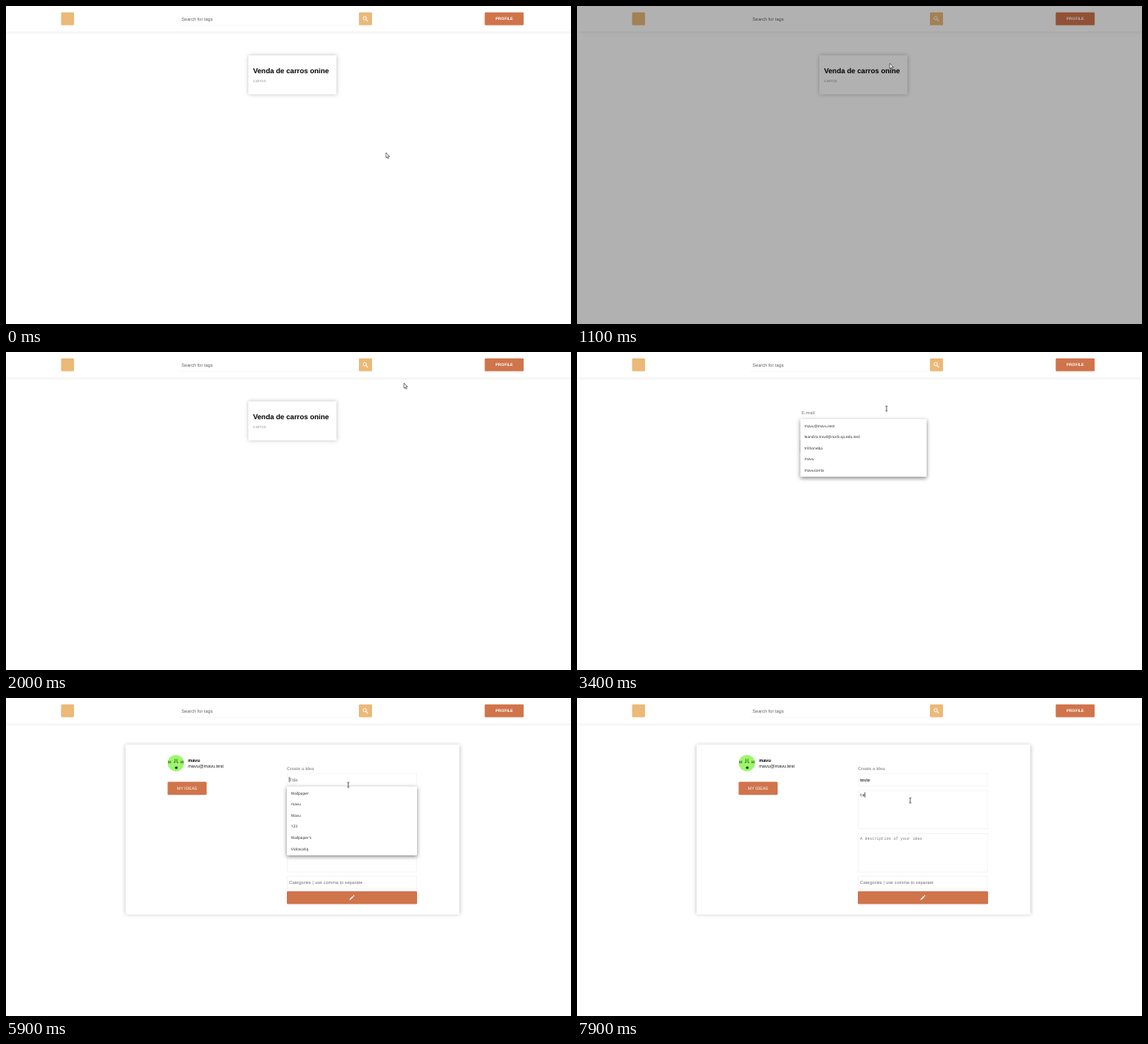
An HTML page with a canvas that plays this animation: 690 px wide and 388 px high, repeating every 8 s.

```html
<!DOCTYPE html>
<html lang="en">
<head>
<meta charset="utf-8">
<title>Idea board</title>
<style>
html, body { margin: 0; width: 100%; height: 100%; overflow: hidden; background: #fff; }
canvas { display: block; width: 100%; height: 100%; }
</style>
</head>
<body>
<canvas id="stage"></canvas>
<script>
const W = 690, H = 388, LOOP = 8000, STEP = 100;
const canvas = document.getElementById('stage');
const ctx = canvas.getContext('2d');

const SANS = '"Liberation Sans", Arial, sans-serif';
const MONO = '"Liberation Mono", monospace';
const MENU = '"Open Sans", sans-serif';
const CLAY = '#d0744b', SAND = '#ebb978', HINT = '#757575', INK = '#111';

const USER = 'mavu', MAIL = 'mavu@mavu.test';
const MAILS = [MAIL, 'leandro.trovil@norb.xp.edu.test', 'trilhoneba', USER, 'mavuconta'];
const TITLES = ['Wallpaper', USER, 'Mavu', '123', "Wallpaper's", 'VidracaXq'];

// Pointer stops: time, x, y
const PATH = [
  [0, 464, 179], [300, 74, 11], [400, 240, 14], [600, 637, 11], [900, 382, 70],
  [1200, 382, 70], [1700, 486, 38], [2000, 486, 38], [2300, 606, 15], [2500, 606, 15],
  [2800, 378, 69], [3800, 378, 69], [4000, 325, 89], [4100, 325, 91], [4200, 325, 99],
  [5300, 325, 99], [5700, 418, 106], [7000, 418, 106], [7300, 407, 125], [LOOP, 407, 125]
];

function pointerAt(t) {
  const i = PATH.findIndex(p => p[0] > t);
  const [t0, x0, y0] = PATH[i - 1], [t1, x1, y1] = PATH[i];
  const k = (t - t0) / (t1 - t0);
  return [x0 + (x1 - x0) * k, y0 + (y1 - y0) * k];
}

const within = (t, a, b) => t >= a && t < b;

// y is the middle of the capitals
function text(str, x, y, size = 5.6, color = INK, { weight = 400, font = SANS, align = 'left' } = {}) {
  ctx.font = `${weight} ${size}px ${font}`;
  ctx.textAlign = align;
  ctx.fillStyle = color;
  ctx.fillText(str, x, y + size * 0.355);
  return ctx.measureText(str).width;
}

function box(x, y, w, h, color, radius = 0) {
  ctx.fillStyle = color;
  ctx.beginPath();
  ctx.roundRect(x, y, w, h, radius);
  ctx.fill();
}

function panel(x, y, w, h, blur, alpha, drop = 0, radius = 0) {
  ctx.save();
  const s = ctx.getTransform().a;
  ctx.shadowColor = `rgba(0,0,0,${alpha})`;
  ctx.shadowBlur = blur * s;
  ctx.shadowOffsetY = drop * s;
  box(x, y, w, h, '#fff', radius);
  ctx.restore();
}

function field(x, y, w, h) {
  ctx.strokeStyle = '#ececec';
  ctx.lineWidth = 0.5;
  ctx.strokeRect(x + 0.25, y + 0.25, w - 0.5, h - 0.5);
}

function button(x, y, w, h, label, size, weight) {
  box(x, y, w, h, CLAY, 1.3);
  if (label) text(label, x + w / 2, y + h / 2, size, '#fff', { weight, align: 'center' });
}

function line(points, color, width) {
  ctx.strokeStyle = color;
  ctx.lineWidth = width;
  ctx.beginPath();
  points.forEach(([x, y], i) => i ? ctx.lineTo(x, y) : ctx.moveTo(x, y));
  ctx.stroke();
}

function dot(x, y, r, color) {
  ctx.fillStyle = color;
  ctx.beginPath();
  ctx.arc(x, y, r, 0, Math.PI * 2);
  ctx.fill();
}

function caret(x, y) {
  box(x, y - 3.3, 0.6, 6.6, '#000');
}

function header() {
  panel(0, -6, W, 37.3, 5, 0.16);
  box(67.3, 7.8, 15.8, 15.8, SAND, 1.3);
  text('Search for tags', 214.3, 15.6, 5.65, '#666');
  box(212, 23, 219, 0.5, '#f1f1f1');
  box(431, 7.8, 16, 15.8, SAND, 1.3);
  ctx.strokeStyle = '#fff';
  ctx.lineWidth = 0.9;
  ctx.beginPath();
  ctx.arc(438.1, 14.8, 2, 0, Math.PI * 2);
  ctx.stroke();
  line([[439.6, 16.3], [441.9, 18.6]], '#fff', 1.1);
  button(584.6, 7.8, 47.6, 15.8, 'PROFILE', 4.9, 700);
}

function homePage() {
  panel(296, 60.3, 107.5, 47.5, 5, 0.24);
  text('Venda de carros onine', 301.7, 79, 8.7, '#000', { weight: 700 });
  text('carros', 301.8, 91.3, 5.7, '#aaa');
}

function menu(x, y, w, items, hover) {
  const pitch = 13.55;
  panel(x, y, w, items.length * pitch + 2.8, 5, 0.5, 1.6, 0.8);
  items.forEach((item, i) => {
    const mid = y + 8.4 + i * pitch;
    if (i === hover) box(x, mid - pitch / 2, w, pitch, '#ececec');
    text(item, x + 5, mid, 4.6, '#222', { font: MENU });
  });
}

function loginPage(t) {
  const x = 272.7, w = 154.3;
  const filled = t >= 4100;
  const typed = [4500, 4800, 4900].filter(k => t >= k).length;

  if (filled) box(x, 65.8, w, 15.7, '#e8f0fe');
  text(filled ? MAIL : 'E-mail', 274.2, 73.6, 5.6, filled ? INK : HINT);

  if (typed) {
    for (let i = 0; i < typed; i++) dot(275.5 + i * 2.3, 94.6, 0.85, INK);
    ctx.fillStyle = '#222';
    ctx.beginPath();
    ctx.ellipse(420.7, 94.5, 2.9, 1.9, 0, 0, Math.PI * 2);
    ctx.fill();
    dot(420.7, 94.5, 1.35, '#fff');
    dot(420.7, 94.5, 0.8, '#222');
  } else {
    text('Password', 274.2, 94.4, 5.6, HINT);
  }
  if (t >= 4200) caret(274.4 + typed * 2.3, 94.4);

  button(x, 107, w, 16, 'SUBMIT', 5.1, 700);
  text('Create a account', x, 128.6, 5.5, '#333');

  if (within(t, 2900, 3400) || within(t, 3900, 4100)) caret(274.2, 73.6);
  if (within(t, 2900, 4100)) menu(x, 81.8, w, MAILS, t >= 4000 ? 0 : -1);
}

function avatar() {
  dot(207.5, 79.4, 10, '#9bf76a');
  for (const x of [199.8, 215]) {
    line([[x - 1.2, 76.5], [x - 1.2, 79.8]], '#243018', 0.6);
    line([[x - 1.2, 78.2], [x + 1.2, 78.2]], '#243018', 0.6);
    line([[x + 1.2, 76.5], [x + 1.2, 79.8]], '#243018', 0.6);
  }
  line([[206.3, 74.3], [206.3, 78.8], [204.8, 78.8]], '#243018', 0.7);
  line([[208.8, 74.3], [208.8, 78.8], [210.4, 78.8]], '#243018', 0.7);
  dot(208, 85, 1.6, '#111');
}

function profilePage(t) {
  const x = 343, w = 159, left = 345.7;
  const mono = { font: MONO };
  panel(146, 56.7, 407.6, 207.6, 5, 0.28);
  avatar();
  text(USER, 222.2, 76.2, 5.6, '#000', { weight: 700 });
  text(MAIL, 222.2, 83, 5.6, '#222');
  button(197.4, 102.3, 47.6, 16, 'MY IDEAS', 5.2, 400);

  text('Create a Idea', x, 85.7, 5.3, '#999', { weight: 700 });
  field(x, 91.8, w, 15.6);
  field(x, 112.6, w, 47.2);
  field(x, 165.2, w, 47.2);
  field(x, 217.5, w, 15.6);

  const title = 'teste'.slice(0, t < 6500 ? 0 : t < 6700 ? (t - 6400) / 100 : (t - 6300) / 100);
  const titleW = text(title || 'Title', left + (title ? 0 : 0.4), 99.7, 5.6, title ? INK : HINT);
  if (within(t, 5800, 6300) || within(t, 6500, 7100)) caret(left + (title ? titleW : 0), 99.5);

  const body = 'te'.slice(0, Math.max(0, t - 7700) / 100);
  const bodyW = text(body || 'A short description of your idea', left, 118.4, 4.85, body ? INK : HINT, mono);
  if (within(t, 7100, 7600) || t >= 7800) caret(left + (body ? bodyW : 0), 118.3);

  text('A description of your idea', left, 171, 4.85, HINT, mono);
  text('Categories | use comma to separate', left, 225.3, 5.57, HINT);

  button(x, 235.8, w, 15.7);
  line([[420.1, 245.8], [423.7, 242.2]], '#fff', 1.6);
  line([[424.2, 241.7], [425.1, 240.8]], '#fff', 1.6);
  line([[419.5, 246.4], [420.3, 245.6]], '#fff', 0.9);

  if (within(t, 5800, 6500)) menu(x, 107.8, w, TITLES, -1);
}

function arrow(x, y) {
  const shape = [[0, 0], [0, 6.3], [1.4, 5], [2.4, 7.2], [3.4, 6.7], [2.5, 4.6], [4.4, 4.5]];
  ctx.beginPath();
  shape.forEach(([dx, dy]) => ctx.lineTo(x + dx, y + dy));
  ctx.closePath();
  ctx.fillStyle = '#fff';
  ctx.fill();
  ctx.strokeStyle = '#222';
  ctx.lineWidth = 0.6;
  ctx.stroke();
}

function beam(x, y) {
  line([[x, y - 3], [x, y + 3]], '#222', 0.7);
  for (const dy of [-3, 3]) line([[x - 1.4, y + dy], [x + 1.4, y + dy]], '#222', 0.6);
}

function draw(t) {
  ctx.fillStyle = '#fff';
  ctx.fillRect(0, 0, W, H);
  if (t < 2500) homePage();
  else if (t < 5300) loginPage(t);
  else profilePage(t);
  header();
  if (within(t, 1100, 2000)) box(0, 0, W, H, 'rgba(0,0,0,0.305)');

  const overText = within(t, 2800, 3900) || within(t, 4200, 5300) || t >= 5600;
  (overText ? beam : arrow)(...pointerAt(t));
}

function frame() {
  const dpr = window.devicePixelRatio || 1;
  const w = Math.round(innerWidth * dpr), h = Math.round(innerHeight * dpr);
  if (canvas.width !== w || canvas.height !== h) {
    canvas.width = w;
    canvas.height = h;
  }
  ctx.setTransform(w / W, 0, 0, h / H, 0, 0);
  ctx.textRendering = 'geometricPrecision';
  const t = (performance.now() - start) % LOOP;
  draw(Math.floor(t / STEP) * STEP);
  requestAnimationFrame(frame);
}

const start = performance.now();
frame();
</script>
</body>
</html>
```
